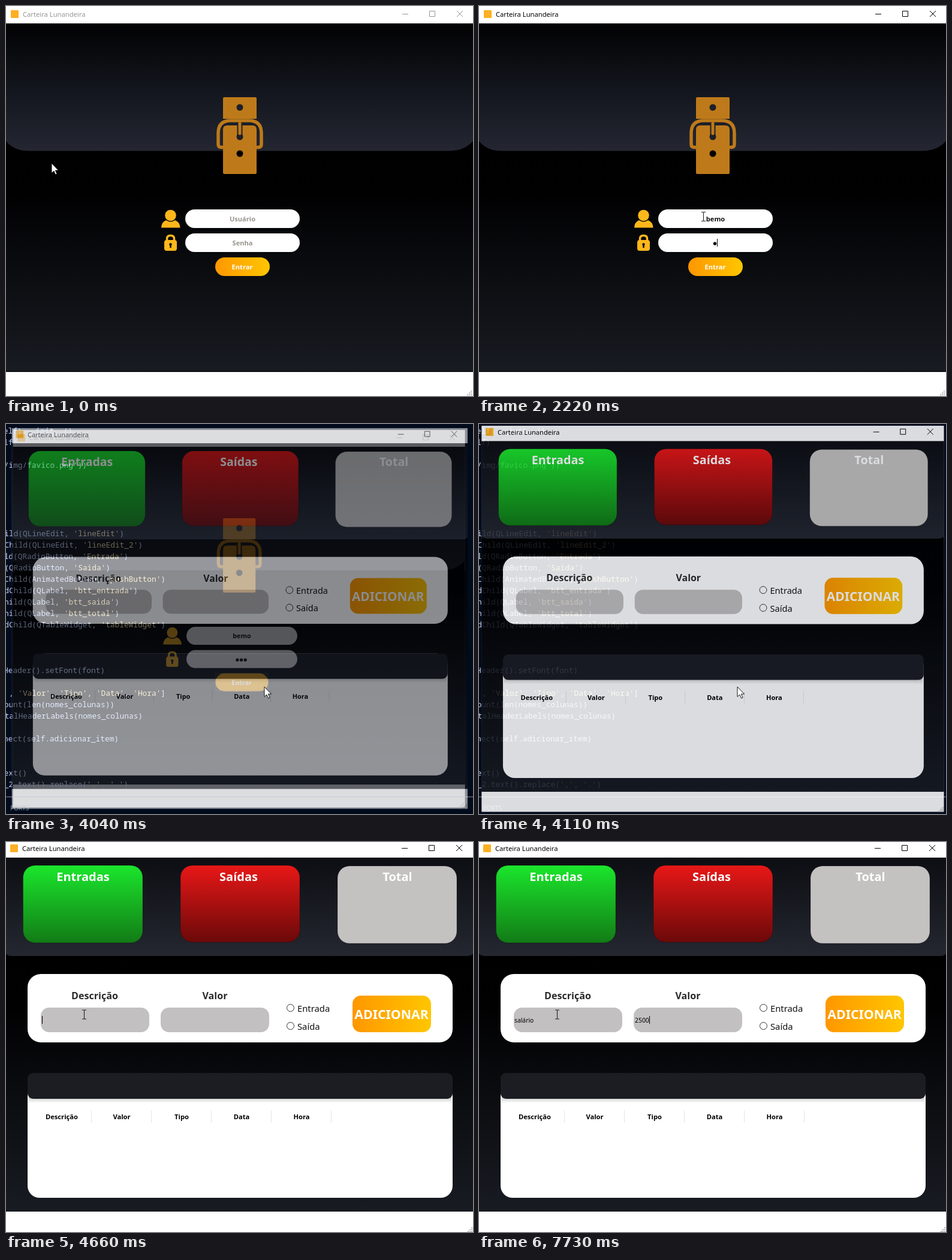
An HTML page for the animation above (8000 ms loop, 779x650 px).

```html
<!DOCTYPE html>
<html lang="pt">
<head>
<meta charset="utf-8">
<title>Carteira Lunandeira</title>
<style>
  html, body { margin: 0; width: 779px; height: 650px; overflow: hidden; background: #010b1c; }
  svg { display: block; }
  text { font-family: "Noto Sans", "Open Sans", sans-serif; }
  .bold { font-weight: 700; }
  .mid { text-anchor: middle; }
  .small { font-size: 11.1px; font-weight: 700; text-anchor: middle; }
  .code { font: 12.8px "Noto Sans Mono", "DejaVu Sans Mono", monospace; text-anchor: end; fill: #c3d3fb; }
  .code .str { fill: #efdcab; }
  .caret { stroke: #000; stroke-width: 1; }
</style>
</head>
<body>
<svg width="779" height="650" viewBox="0 0 779 650">
  <defs>
    <linearGradient id="flap" x2="0" y2="1">
      <stop offset="0" stop-color="#020203"/><stop offset=".5" stop-color="#12151c"/><stop offset="1" stop-color="#242732"/>
    </linearGradient>
    <linearGradient id="body" x2="0" y2="1">
      <stop offset="0" stop-color="#000"/><stop offset=".2" stop-color="#010102"/><stop offset="1" stop-color="#181b22"/>
    </linearGradient>
    <linearGradient id="flap2" x2="0" y2="1">
      <stop offset="0" stop-color="#0d0e13"/><stop offset="1" stop-color="#242730"/>
    </linearGradient>
    <linearGradient id="green" x2="0" y2="1">
      <stop offset="0" stop-color="#1be62c"/><stop offset="1" stop-color="#127b16"/>
    </linearGradient>
    <linearGradient id="red" x2="0" y2="1">
      <stop offset="0" stop-color="#e81717"/><stop offset="1" stop-color="#6b0909"/>
    </linearGradient>
    <linearGradient id="amber">
      <stop offset="0" stop-color="#ff9700"/><stop offset="1" stop-color="#ffc600"/>
    </linearGradient>
    <linearGradient id="shade" x2="0" y2="1">
      <stop offset="0" stop-color="#000" stop-opacity=".2"/><stop offset="1" stop-color="#000" stop-opacity="0"/>
    </linearGradient>
    <g id="grip" fill="#b5b5b5">
      <path d="M775 641h2v2h-2zM772 644h2v2h-2zM775 644h2v2h-2zM769 647h2v2h-2zM772 647h2v2h-2zM775 647h2v2h-2z"/>
    </g>
    <g id="bar">
      <rect x="8" y="7" width="13" height="13" rx="1" fill="#fdb022" stroke="none"/>
      <text x="28" y="18" font-size="11.2" fill="currentColor">Carteira Lunandeira</text>
      <path d="M661 13.5h10M706.5 8.5h9v9h-9zM752 8l10 10M762 8l-10 10" fill="none" stroke="currentColor"/>
    </g>
  </defs>

  <rect width="779" height="650" fill="#010b1c"/>

  <g id="login">
    <rect width="779" height="650" fill="#fff"/>
    <rect y="29" width="779" height="581" fill="#000"/>
    <rect y="241" width="779" height="369" fill="url(#body)"/>
    <path d="M0 29H779V225Q764 241.500 740 241.500H38Q13 241.500 0 225Z" fill="url(#flap)"/>
    <path d="M0 609h779" stroke="#0d0f13" stroke-width="2"/>
    <use href="#bar" id="loginBar"/>
    <use href="#grip"/>
    <g fill="#be7a1a">
      <path d="M362 188V154q0-2 2-2h52q2 0 2 2v34z"/>
      <path d="M362 235.500h-3q-5 0-5-5V212q0-21 21-21h30q21 0 21 21v18.500q0 5-5 5h-3" fill="none" stroke="#be7a1a" stroke-width="5.500"/>
      <path d="M362 278V206q0-7 7-7h42q7 0 7 7v72q0 2-2 2h-52q-2 0-2-2z"/>
    </g>
    <g fill="#1d2029">
      <circle cx="390" cy="169" r="5.500"/>
      <circle cx="390" cy="218" r="5.500"/>
      <rect x="385.500" y="199" width="9" height="18"/>
      <circle cx="390" cy="246" r="5.500" fill="#000"/>
    </g>
    <rect x="387.500" y="193" width="5" height="22" rx="2.500" fill="#be7a1a"/>

    <g fill="#ffb71b">
      <path d="M259 369.500q0-9 8-12.500q7.500 5 15 0q8.500 3.500 8.500 12.500z"/>
      <circle cx="274.500" cy="349" r="9.800" stroke="#000" stroke-width="1"/>
      <rect x="264" y="390" width="21" height="18" rx="4"/>
      <path d="M268.500 391v-3q0-5.500 6-5.500t6 5.500v3" fill="none" stroke="#ffb71b" stroke-width="3.500"/>
    </g>
    <path d="M274.500 395a2.300 2.300 0 0 1 1.300 4.200V403h-2.600v-3.800A2.300 2.300 0 0 1 274.500 395z" fill="#111"/>

    <rect x="299" y="339" width="191" height="31" rx="15.500" fill="#fff"/>
    <rect x="299" y="379" width="191" height="31" rx="15.500" fill="#fff"/>
    <text id="user" class="small" x="394.500" y="359"></text>
    <text id="pass" class="small" x="394.500" y="399" fill="#99958f">Senha</text>
    <g id="dots"><circle cy="396" r="2.700"/><circle cy="396" r="2.700"/><circle cy="396" r="2.700"/></g>
    <path id="userCaret" class="caret" d="M0 348v13"/>
    <path id="passCaret" class="caret" d="M0 388v13"/>
    <rect id="enter" x="349" y="419" width="91" height="31" rx="15.500"/>
    <rect id="focus" x="349.500" y="419.500" width="90" height="29" fill="none" stroke="#8a8a8a" stroke-dasharray="1 1" stroke-opacity=".7"/>
    <text class="small" x="394" y="439" fill="#fff">Entrar</text>
  </g>

  <g id="code"></g>

  <g id="main">
    <rect width="779" height="650" fill="#fff"/>
    <rect y="26" width="779" height="590" fill="#000"/>
    <rect y="190" width="779" height="426" fill="url(#body)"/>
    <path d="M0 26H779V186q-3 4-10 4H10q-7 0-10-4z" fill="url(#flap2)"/>
    <g transform="translate(-1 -3)"><use href="#bar" color="#000"/></g>
    <g transform="translate(1 1)"><use href="#grip"/></g>
    <g stroke="#000" stroke-opacity=".25">
      <rect x="28.500" y="39" width="199.500" height="129" rx="20" fill="url(#green)"/>
      <rect x="291" y="39" width="199" height="128" rx="20" fill="url(#red)"/>
      <rect x="553" y="40" width="199" height="129" rx="20" fill="#c4c2c1"/>
    </g>
    <g class="bold mid" font-size="20" fill="#fff">
      <text x="128.500" y="65">Entradas</text>
      <text x="388" y="65">Saídas</text>
      <text x="653" y="65">Total</text>
    </g>
    <rect x="36" y="220" width="709" height="114" rx="22" fill="#fff"/>
    <rect x="58" y="276" width="181" height="41" rx="14" fill="#c2c0c0"/>
    <rect x="258" y="276" width="181" height="41" rx="14" fill="#c2c0c0"/>
    <g class="bold mid" font-size="16.100" fill="#2b2b2b">
      <text x="148" y="262">Descrição</text>
      <text x="348.500" y="262">Valor</text>
    </g>
    <g fill="#fff" stroke="#333">
      <circle cx="474.500" cy="276.500" r="6"/><circle cx="474.500" cy="306.500" r="6"/>
    </g>
    <g font-size="14.800" fill="#111">
      <text x="486" y="283">Entrada</text><text x="486" y="313">Saída</text>
    </g>
    <rect x="578" y="256" width="131" height="61" rx="14" fill="url(#amber)"/>
    <text class="bold mid" x="643" y="295" font-size="21.300" fill="#fff">ADICIONAR</text>
    <rect x="36" y="385" width="709" height="208" rx="20" fill="#fff"/>
    <rect x="38" y="426" width="705" height="9" fill="url(#shade)"/>
    <rect x="36" y="385" width="709" height="43" rx="9" fill="#1b1d23"/>
    <path d="M142.500 447v21M242.500 447v21M342.500 447v21M442.500 447v21M542.500 447v21" stroke="#e6e6e6"/>
    <g id="heads" class="bold mid" font-size="11.200"></g>
    <text id="desc" x="59" y="301" font-size="10.300"></text>
    <text id="value" x="260" y="301" font-size="10.400"></text>
    <path id="descCaret" class="caret" d="M0 290v13"/>
    <path id="valueCaret" class="caret" d="M0 290v13"/>
  </g>

  <path id="arrow" d="M0 0V16.500L3.800 13L6.500 19L9 18L6.400 12H11.500Z" fill="#fff" stroke="#000" stroke-width=".9"/>
  <path id="beam" d="M-3.500-7.500H-1L0-7L1-7.500H3.500M0-7V7M-3.500 7.500H-1L0 7L1 7.500H3.500" fill="none" stroke="#222" stroke-width="1.100"/>
</svg>

<script>
const LOOP = 8000, TICK = 1000 / 15;
const $ = id => document.getElementById(id);
const show = (id, on) => { $(id).style.display = on ? '' : 'none'; };
const within = (t, a, b) => t >= a && t < b;
const count = (t, times) => times.filter(x => t >= x).length;
const held = (t, rows) => rows.filter(r => t >= r[0]).pop();

const USER = 'bemo', DESC = 'salário', VALUE = '2500';
const keys = {
  user: [1270, 1400, 1540, 1670],
  pass: [2220, 2550, 2940],
  desc: [5200, 5270, 5400, 5600, 5730, 5930, 6130],
  value: [7000, 7200, 7530, 7730]
};

// time, opacity, x, y, scale
const loginSteps = [
  [0, 1, 0, 0, 1], [3970, .95, .8, .6, .998], [4040, .7, 11.6, 9.9, .968], [4110, 0, 12, 10, .96]
];
const mainSteps = [
  [0, 0, 16, 14, .955], [3970, .05, 16, 14, .955], [4040, .54, 9.7, 6.9, .976],
  [4110, .86, 4.3, 2.9, .99], [4180, .97, 1.3, .9, .997], [4250, 1, 0, 0, 1]
];
const codeSteps = [[0, 0], [3970, .1], [4040, 1]];

// pointer stops: time, x, y
const stops = [
  [0, 76, 262], [70, 76, 262], [600, 374.5, 351], [3000, 374.5, 351], [3080, 377, 351],
  [3220, 377, 351], [3670, 431, 438], [4180, 431, 438], [4590, 130.5, 287.5], [LOOP, 130.5, 287.5]
];

// baseline, right end, text
const lines = [
  [16, 111, "elf).__init__()"], [35, 19, "lf)"], [73, 135, "/img/favico.png'))"],
  [187, 197, "ild(QLineEdit, 'lineEdit')"], [206, 228, "Child(QLineEdit, 'lineEdit_2')"],
  [225, 204, "ld(QRadioButton, 'Entrada')"], [244, 174, "(QRadioButton, 'Saida')"],
  [263, 266, "Child(AnimatedButton, 'pushButton')"], [282, 220, "dChild(QLabel, 'btt_entrada')"],
  [301, 189, "hild(QLabel, 'btt_saida')"], [320, 189, "hild(QLabel, 'btt_total')"],
  [339, 266, "dChild(QTableWidget, 'tableWidget')"], [415, 165, "Header().setFont(font)"],
  [453, 266, ", 'Valor', 'Tipo', 'Data', 'Hora']"], [472, 181, "ount(len(nomes_colunas))"],
  [491, 228, "talHeaderLabels(nomes_colunas)"], [529, 188, "nect(self.adicionar_item)"],
  [586, 35, "ext()"], [605, 204, "_2.text().replace(',', '.')"]
];
$('code').innerHTML = lines.map(([y, x, s]) =>
  `<text class="code" x="${x}" y="${y}">${s.replace(/'[^']+'/g, '<tspan class="str">$&</tspan>')}</text>`
).join('') + '<path d="M0 621.5h779" stroke="#8090a8"/><text x="7" y="644" font-size="10" fill="#8090a8">PORTS</text>';

$('heads').innerHTML = ['Descrição', 'Valor', 'Tipo', 'Data', 'Hora']
  .map((s, i) => `<text x="${93 + 100 * i}" y="462">${s}</text>`).join('');

function setText(id, s) {
  if ($(id).textContent !== s) $(id).textContent = s;
}
function caret(id, on, x) {
  show(id, on);
  if (on) $(id).setAttribute('transform', `translate(${Math.round(x) + .5} 0)`);
}
function place(id, [, opacity, x, y, s]) {
  show(id, opacity > 0);
  $(id).setAttribute('opacity', opacity);
  $(id).setAttribute('transform', `translate(${x} ${y}) scale(${s})`);
}
function pointer(t) {
  const i = stops.findIndex(s => s[0] > t);
  const [t0, x0, y0] = stops[i - 1], [t1, x1, y1] = stops[i];
  const p = (t - t0) / (t1 - t0), e = p * p * (3 - 2 * p);
  return [x0 + (x1 - x0) * e, y0 + (y1 - y0) * e];
}

function drawLogin(t) {
  const active = within(t, 600, 3900);
  $('loginBar').setAttribute('color', active ? '#000' : '#959595');
  const empty = t < 600;
  setText('user', empty ? 'Usuário' : USER.slice(0, count(t, keys.user)));
  $('user').setAttribute('fill', empty ? '#99958f' : '#111');
  const userOn = within(t, 600, 940) || within(t, 1270, 1950);
  caret('userCaret', userOn, 394 + (userOn ? $('user').getComputedTextLength() / 2 : 0));

  show('pass', t < 1950);
  const n = count(t, keys.pass);
  [...$('dots').children].forEach((dot, i) => {
    dot.style.display = i < n ? '' : 'none';
    dot.setAttribute('cx', 393.5 + 6.8 * (i - (n - 1) / 2));
  });
  caret('passCaret', within(t, 1950, 3670), 393.5 + 3.4 * n);
  $('enter').setAttribute('fill', t >= 3540 ? '#ffa80c' : 'url(#amber)');
  show('focus', t >= 3670);
}

function drawMain(t) {
  setText('desc', DESC.slice(0, count(t, keys.desc)));
  setText('value', VALUE.slice(0, count(t, keys.value)));
  const descOn = within(t, 4660, 5060) || within(t, 5200, 6260);
  const valueOn = within(t, 6260, 6470) || t >= 7000;
  caret('descCaret', descOn, descOn ? 60 + $('desc').getComputedTextLength() : 0);
  caret('valueCaret', valueOn, valueOn ? 260 + $('value').getComputedTextLength() : 0);
}

function drawPointer(t) {
  const [x, y] = pointer(Math.floor(t / TICK + .01) * TICK);
  const beam = t < 4040
    ? within(x, 299, 490) && (within(y, 339, 370) || within(y, 379, 410))
    : within(y, 276, 317) && (within(x, 58, 239) || within(x, 258, 439));
  show('beam', beam);
  show('arrow', !beam);
  $(beam ? 'beam' : 'arrow').setAttribute('transform', `translate(${x} ${y})`);
}

function draw(t) {
  place('login', held(t, loginSteps));
  place('main', held(t, mainSteps));
  $('code').setAttribute('opacity', held(t, codeSteps)[1]);
  if (t < 4110) drawLogin(t);
  if (t >= 3970) drawMain(t);
  drawPointer(t);
}

const start = performance.now();
function frame() {
  draw((performance.now() - start) % LOOP);
  requestAnimationFrame(frame);
}
frame();
</script>
</body>
</html>
```
